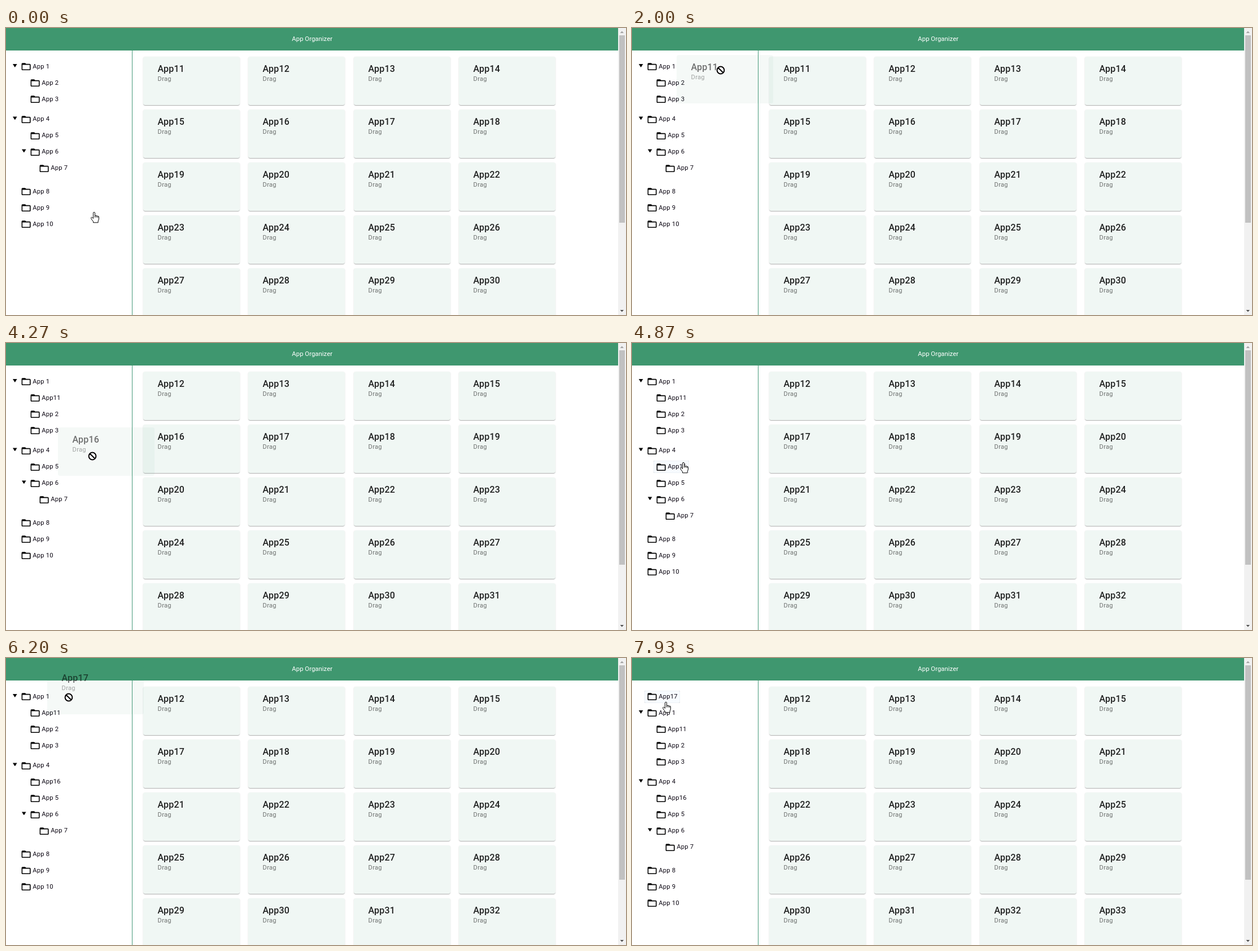
Write an HTML page that moves like this. It is 1098x510 px and loops after 8000 ms.

```html
<!DOCTYPE html>
<html lang="en">
<head>
<meta charset="utf-8">
<title>App Organizer</title>
<style>
html, body { margin: 0; width: 100%; height: 100%; overflow: hidden; background: #fff; }
body { position: relative; font: 11.2px Roboto, sans-serif; color: rgba(0,0,0,.87); }
body *, svg { position: absolute; white-space: nowrap; }
header { left: 0; top: 0; width: 1084.4px; height: 40px; background: #3f976f; color: #fff;
  font-size: 11.4px; line-height: 39px; text-align: center; }
#divider { left: 223px; top: 40px; width: 1px; height: 470px; background: #46987a; }
.card { width: 171px; height: 86px; border-radius: 3.5px; background: rgba(63,151,112,.08);
  box-shadow: 0 1.6px .8px -.8px rgba(0,0,0,.2), 0 .8px .8px rgba(0,0,0,.14), 0 .8px 2.4px rgba(0,0,0,.12); }
.card b { left: 25.6px; top: 11.5px; font: 500 16px/20px Roboto, sans-serif; letter-spacing: .2px; }
.card i { left: 25.6px; top: 32px; font-style: normal; line-height: 16px; letter-spacing: .2px; color: rgba(0,0,0,.54); }
#ghost { left: 0; top: 0; opacity: .65; box-shadow: none; }
.row { height: 22px; line-height: 22px; padding: 0 4px 0 25.3px; letter-spacing: .2px; color: #0b0612; border-radius: 2px; }
.row svg { left: 4px; top: 1.3px; width: 19.2px; height: 19.2px; }
.row.hover { background: #f7fbff; box-shadow: inset 0 0 1px #999; }
.toggle { width: 7.6px; height: 6px; background: #000; clip-path: polygon(0 0, 100% 0, 50% 100%); }
#slot { box-sizing: border-box; height: 19.2px; background: #dfe; border: 1.6px dotted #888; }
#bar { left: 1084.4px; top: 0; width: 13.6px; height: 510px; background: #f1f1f1; }
#thumb { left: 1.6px; top: 13.4px; width: 10.4px; background: #c1c1c1; }
#bar svg { left: 0; top: 0; }
#pointer { left: 0; top: 0; overflow: visible; }
</style>
</head>
<body>
<header>App Organizer</header>
<div id="divider"></div>
<div id="cards"></div>
<div id="slot"></div>
<div id="tree"></div>
<div id="bar">
  <div id="thumb"></div>
  <svg width="14" height="510"><path d="M3.6 9l3.2-3.4L10 9z" fill="#a3a3a3"/><path d="M3.6 501l3.2 3.4 3.2-3.4z" fill="#505050"/></svg>
</div>
<div id="ghost" class="card"></div>
<svg id="pointer" width="20" height="20"></svg>
<script>
const $ = id => document.getElementById(id);
const TICKS_PER_MS = 0.015, LOOP = 8000;

const linear = u => u;
const out = u => u * (2 - u);
const smooth = u => u * u * (3 - 2 * u);

// Pointer path: tick, x, y, easing into that point
const path = [
  [0, 156, 327], [2, 156, 327], [15, 334, 58, smooth], [16, 334, 58], [17, 322, 79], [19, 322, 79], [20, 321, 79],
  [23, 321, 79], [24, 238, 84], [30, 157, 75], [36, 102, 85, out],
  [49, 102, 85], [53, 327, 193, out], [54, 304, 193],
  [59, 304, 193], [64, 153, 201], [68, 83, 212, out],
  [72, 83, 212], [80, 279, 201, smooth], [82, 279, 201], [83, 284, 202],
  [84, 284, 202], [93, 111, 70], [97, 65, 67, out], [98, 62, 66], [103, 62, 66], [105, 61, 68],
  [110, 61, 68], [115, 65, 67], [118, 65, 67], [119, 60, 78], [120, 60, 78]
];

// Drags: ticks of grab, permitted, slot open and drop; app, tree index, level, grip offset
const drags = [
  { grab: 24, allow: 35, open: 35, drop: 42, app: 11, index: 1, level: 1, dx: 78, dy: 27 },
  { grab: 60, allow: 67, open: 67, drop: 73, app: 16, index: 5, level: 1, dx: 61, dy: 51 },
  { grab: 85, allow: 98, open: 104, drop: 111, app: 17, index: 0, level: 0, dx: 38, dy: 56 }
];

const levels = [0, 1, 1, 0, 1, 1, 2, 0, 0, 0];
const trees = [levels.map((level, i) => ({ name: `App ${i + 1}`, level }))];
const stacks = [Array.from({ length: 25 }, (_, i) => i + 11)];
drags.forEach((d, i) => {
  trees.push(trees[i].toSpliced(d.index, 0, { name: `App${d.app}`, level: d.level }));
  stacks.push(stacks[i].filter(n => n !== d.app));
});

const folder = `<svg viewBox="0 0 24 24"><path d="M20 6h-8l-2-2H4c-1.1 0-2 .9-2 2v12c0 1.1.9 2 2 2h16c1.1 0 2-.9 2-2V8c0-1.1-.9-2-2-2zm0 12H4V8h16z"/></svg>`;
const pointers = {
  arrow: `<path d="M.5.5v14l3.3-3.1 2.1 4.9 2-.9-2.1-4.8h4.3z" fill="#fff" stroke="#000"/>`,
  hand: `<path d="M-1.5 1.8a1.5 1.5 0 0 1 3 0V6.6q1.5-.9 2.6.3 1.6-.7 2.5.5 1.8-.3 1.8 1.4V12q0 2-1.3 4v2.8H-1.5v-2Q-5.4 12.4-5.5 10.300q.6-1.800 2.200-.6l1.800 1.700z" fill="#fff" stroke="#000"/><path d="M1.5 6.600v3M4.100 7v2.800M6.600 7.600v2.400" stroke="#000" fill="none"/>`,
  blocked: ["#fff", "#000"].map((c, i) =>
    `<path d="M-4.500-4.500l9 9M-6.400 0a6.400 6.400 0 1 0 12.800 0a6.400 6.400 0 1 0-12.800 0" fill="none" stroke="${c}" stroke-width="${4 - 2 * i}"/>`).join("")
};

const cardText = n => `<b>App${n}</b><i>Drag</i>`;
const place = (el, x, y) => el.style.transform = `translate(${x}px,${y}px)`;

function pointerAt(tick) {
  const k = Math.max(1, path.findIndex(p => p[0] >= tick));
  const [t0, x0, y0] = path[k - 1], [t1, x1, y1, ease = linear] = path[k];
  const u = ease((tick - t0) / (t1 - t0));
  return [Math.round(x0 + (x1 - x0) * u), Math.round(y0 + (y1 - y0) * u)];
}

function layout(tree, slotIndex) {
  let top = 58;
  return tree.map((node, i) => {
    if (i) top += 29 + 6.4 * Math.max(0, tree[i - 1].level - node.level);
    if (i === slotIndex) top += 13;
    return { ...node, left: 22 + 16 * node.level, top, parent: tree[i + 1]?.level > node.level };
  });
}

function drawCards(stage) {
  $("cards").innerHTML = stacks[stage].slice(0, 20).map((n, i) =>
    `<div class="card" style="left:${243 + Math.round(i % 4 * 186.4)}px;top:${51 + 94 * (i >> 2)}px">${cardText(n)}</div>`).join("");
  $("thumb").style.height = (stage ? 381 : 333) + "px";
}

function drawTree(rows, hovered) {
  $("tree").innerHTML = rows.map(r =>
    (r.parent ? `<div class="toggle" style="left:${r.left - 10}px;top:${r.top + 6}px"></div>` : "") +
    `<div class="row${r === hovered ? " hover" : ""}" style="left:${r.left}px;top:${r.top}px">${folder}${r.name}</div>`).join("");
}

let lastTick = -1, lastStage = -1;

function render(tick) {
  const stage = drags.filter(d => tick >= d.drop).length;
  const drag = drags.find(d => tick >= d.grab && tick < d.drop);
  const open = drag && tick >= drag.open;
  const [x, y] = pointerAt(tick);
  const rows = layout(trees[stage], open ? drag.index : -1);
  const hovered = !drag && rows.find(r => x > r.left && x < r.left + 62 && y > r.top && y < r.top + 22);

  if (stage !== lastStage) drawCards(lastStage = stage);
  drawTree(rows, hovered);

  $("slot").hidden = !open;
  if (open) {
    const left = 12 + 16 * drag.level;
    Object.assign($("slot").style, { left: left + "px", width: 200 - 16 * drag.level + "px", top: rows[drag.index].top - 19.6 + "px" });
  }

  $("ghost").hidden = !drag;
  if (drag) {
    $("ghost").innerHTML = cardText(drag.app);
    place($("ghost"), x - drag.dx, y - drag.dy);
  }

  const kind = drag && tick < drag.allow ? "blocked" : hovered || tick < 8 ? "hand" : "arrow";
  $("pointer").innerHTML = pointers[kind];
  place($("pointer"), x, y);
}

function loop() {
  const tick = Math.floor(performance.now() % LOOP * TICKS_PER_MS + 0.1) % 120;
  if (tick !== lastTick) render(lastTick = tick);
  requestAnimationFrame(loop);
}
loop();
</script>
</body>
</html>
```
